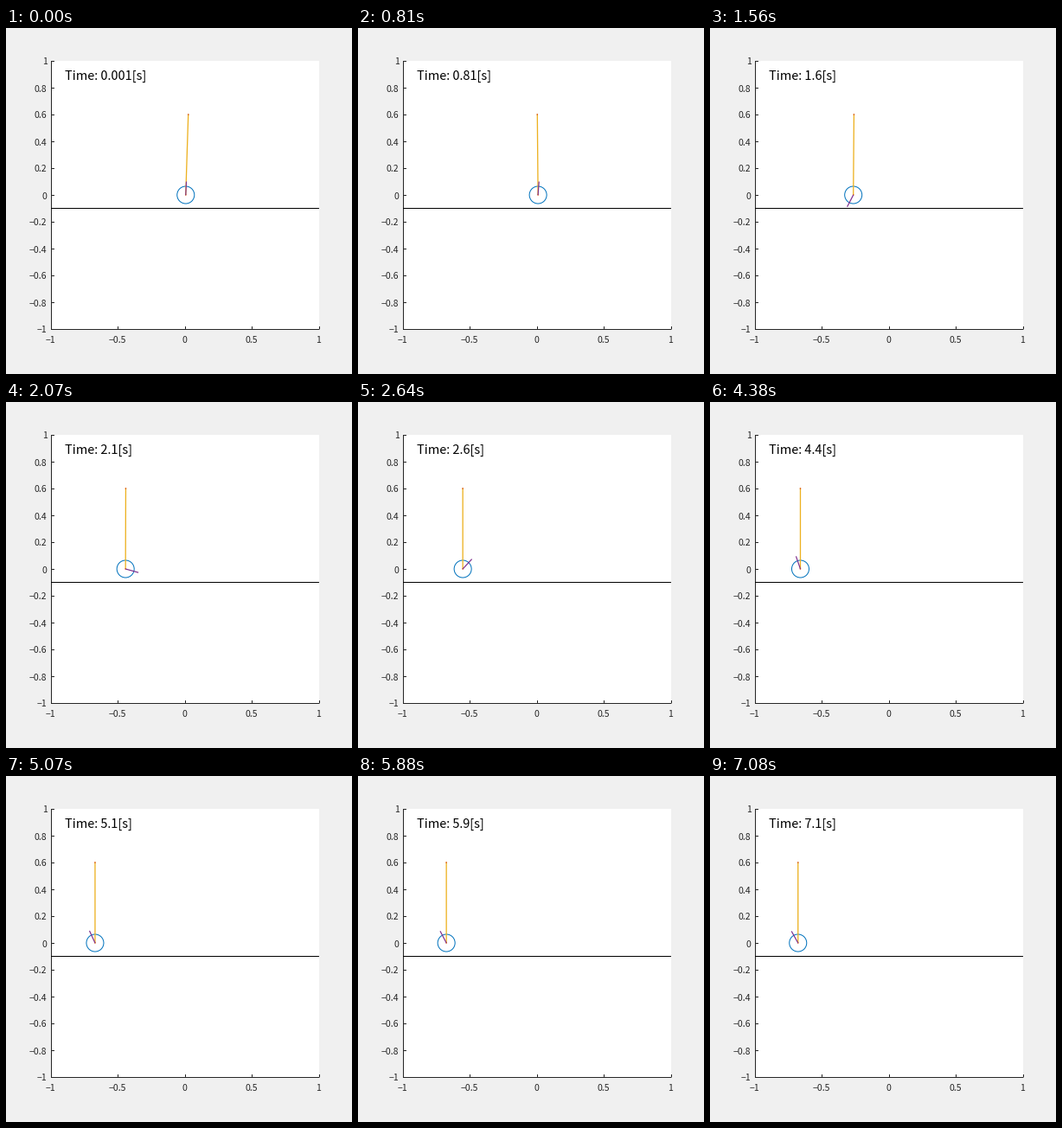
Recreate the animation shown at these times as a matplotlib script. Size 400 px wide and 400 px high, loop 7110 ms.

```python
import numpy as np
import matplotlib.pyplot as plt
from matplotlib.animation import FuncAnimation
from matplotlib.patches import Circle, Rectangle

SIZE, DPI = 400, 100
PX = 72 / DPI                  # one pixel in points
FRAMES, STEP = 237, 30         # frame count, ms per frame
SCALE, X0, Y0 = 155, 207, 193  # pixels per unit, origin in pixels
WHEEL, ROLL, POLE = 10 / SCALE, 0.1, 0.6
INK = "#262626"
BLUE, RED, YELLOW, PURPLE = "#0072BD", "#D95319", "#EDB120", "#7E2F8E"

# Knots of the start-up motion: time, value, slope
T_COAST, X_COAST, X_END, DECAY = 1.56, -0.266, -0.680, 1.1
V_COAST = (X_END - X_COAST) * DECAY
DRIVE = [(0, 0.005, 0), (0.37, 0.039, 0), (0.75, 0.016, -0.14),
         (1.2, -0.091, -0.42), (T_COAST, X_COAST, V_COAST)]
LEAN = [(0, 0.032, 0), (0.35, -0.014, 0), (0.75, -0.010, 0.015),
        (1.45, 0.008, 0), (2.5, 0, 0)]


def hermite(knots, t):
    """Cubic curve through (time, value, slope) knots, held after the last."""
    for (ta, a, va), (tb, b, vb) in zip(knots, knots[1:]):
        if t <= tb:
            h = tb - ta
            s = (t - ta) / h
            return (a * (1 + 2 * s) * (1 - s) ** 2 + h * va * s * (1 - s) ** 2
                    + b * s * s * (3 - 2 * s) + h * vb * s * s * (s - 1))
    return knots[-1][1]


def wheel_x(t):
    if t < T_COAST:
        return hermite(DRIVE, t)
    return X_END + (X_COAST - X_END) * np.exp(-DECAY * (t - T_COAST))


def px(x):
    return X0 + SCALE * x


def py(y):
    return Y0 - SCALE * y


def crisp(p):
    """Centre of the pixel that holds p."""
    return np.floor(p + 1e-6) + 0.5


fig = plt.figure(figsize=(SIZE / DPI, SIZE / DPI), dpi=DPI, facecolor="#F0F0F0")
ax = fig.add_axes([0, 0, 1, 1])
ax.set_xlim(0, SIZE)
ax.set_ylim(SIZE, 0)
ax.axis("off")


def line(xs, ys, color, width=1.0, z=2):
    return ax.plot(xs, ys, color=color, lw=width * PX, zorder=z, snap=False,
                   solid_capstyle="butt")[0]


def label(x, y, s, size, ha, color=INK):
    return ax.text(x, y, s, fontsize=size * PX, ha=ha, va="baseline",
                   color=color, family="Noto Sans CJK JP", zorder=6)


def number(v):
    return f"{v:g}".replace("-", "\u2212")


# Plot area with inward ticks on the left and bottom
left, right, top, bottom = (crisp(p) for p in (px(-1), px(1), py(1), py(-1)))
ax.add_patch(Rectangle((52, 38), 310, 310, fc="white", ec="none", zorder=0))
line([left, left], [top - 0.5, bottom + 0.5], INK)
line([left - 0.5, right - 0.5], [bottom, bottom], INK)
for v in np.round(np.linspace(-1, 1, 11), 1) + 0.0:
    y = crisp(py(v))
    line([left, left + 3.5], [y, y], INK)
    label(47.5, y + 4, number(v), 10.5, "right")
for v in np.linspace(-1, 1, 5):
    x = crisp(px(v))
    line([x, x], [bottom - 3.5, bottom], INK)
    label(x - 1, 363.7, number(v), 10.5, "center")

ground = crisp(py(-0.1))
line([left - 0.5, right - 0.5], [ground, ground], "black", z=5)
clock = label(68, 60, "", 14.55, "left", "black")

wheel = ax.add_patch(Circle((X0, Y0), WHEEL * SCALE, fc="none", ec=BLUE,
                            lw=PX, zorder=2))
pole = line([], [], YELLOW, 1.3, 3)
arm = line([], [], PURPLE, 1.2, 4)
tips = [ax.add_patch(Circle((X0, Y0), 0.8, fc=RED, ec="none", zorder=3.5))
        for _ in range(2)]


def draw(i):
    t = 0.001 + i * STEP / 1000
    x, lean = wheel_x(t), hermite(LEAN, t)
    spin = x / ROLL
    cx = px(x)
    tip = px(x + POLE * np.sin(lean)), py(POLE * np.cos(lean))
    end = px(x + ROLL * np.sin(spin)), py(ROLL * np.cos(spin))
    wheel.center = tips[0].center = cx, Y0
    tips[1].center = tip
    pole.set_data([cx, tip[0]], [Y0, tip[1] - 0.5])
    arm.set_data([cx, end[0]], [Y0, end[1]])
    clock.set_text(f"Time: {t:.2g}[s]")
    return wheel, pole, arm, clock, *tips


anim = FuncAnimation(fig, draw, frames=FRAMES, interval=STEP, repeat=True,
                     repeat_delay=0, blit=False)
plt.show()
```
